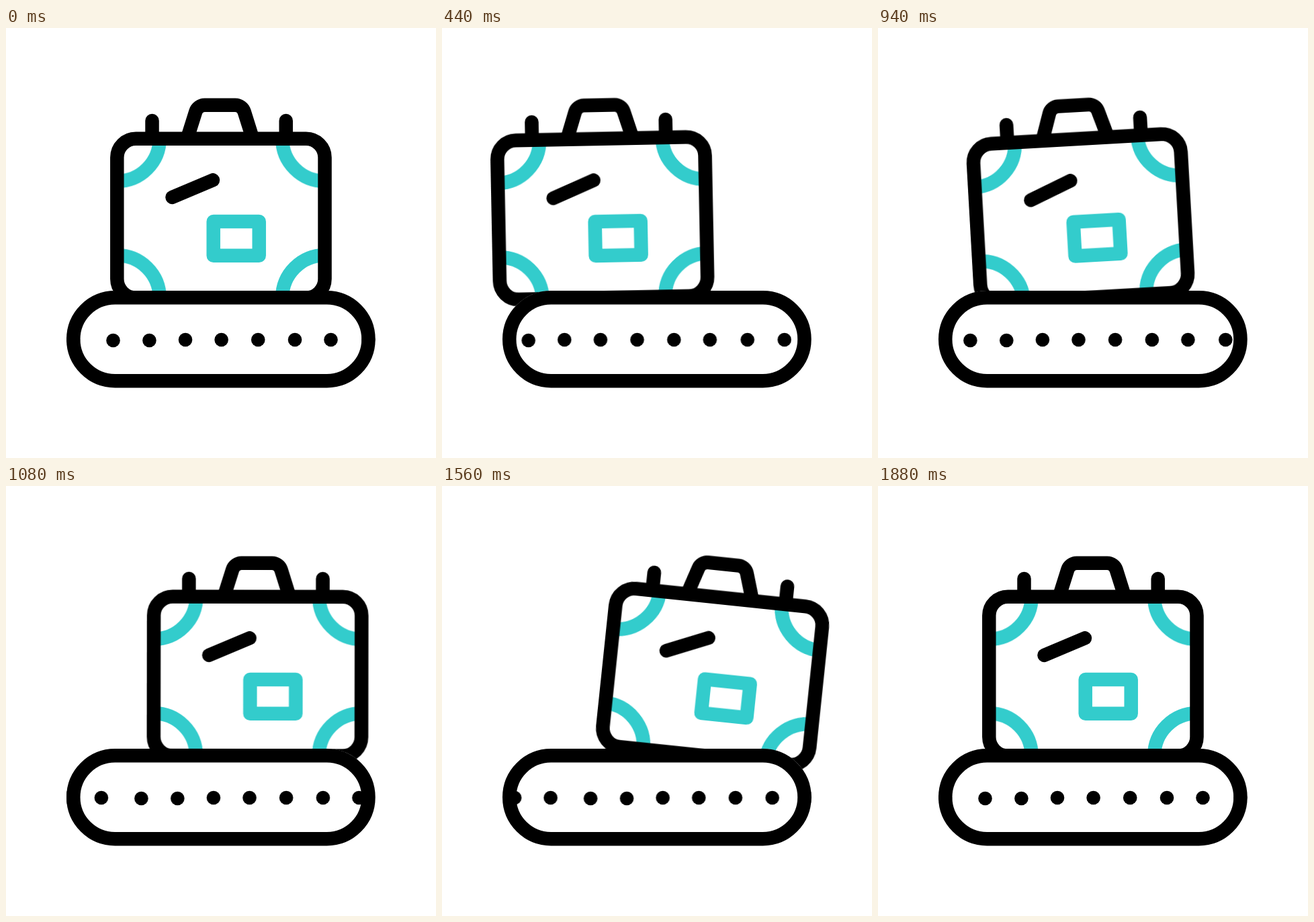
Write an HTML page that moves like this. It is 640x640 px and loops after 2400 ms.

```html
<!DOCTYPE html>
<html lang="en">
<head>
<meta charset="utf-8">
<title>Suitcase on a conveyor</title>
<style>
  html, body { margin: 0; width: 100%; height: 100%; overflow: hidden; background: #fff; }
  svg { display: block; width: 100%; height: 100%; }

  .line { fill: none; stroke: #000; stroke-width: 20.5; }
  .teal { fill: none; stroke: #3cc; stroke-width: 20.5; }
  .round { stroke-linecap: round; stroke-linejoin: round; }

  .slide, .tilt, .dots {
    animation: 2400ms cubic-bezier(.3333, 0, .6667, 1) infinite;
  }
  .slide { animation-name: slide; }
  .tilt { animation-name: tilt; transform-origin: 320px 402px; }
  .dots { animation-name: roll; }

  @keyframes slide {
    0% { transform: translateX(0); }
    26.667% { transform: translateX(-102.4px); }
    55% { transform: translateX(116.6px); }
    78.333%, 100% { transform: translateX(0); }
  }
  @keyframes tilt {
    0%, 14.583% { transform: rotate(0deg); }
    31.667% { transform: rotate(-8.95deg); }
    44.375% { transform: rotate(0deg); }
    56.667% { transform: rotate(8.95deg); }
    78.333%, 100% { transform: rotate(0deg); }
  }
  @keyframes roll {
    0% { transform: translateX(0); }
    26.667% { transform: translateX(-110px); }
    55% { transform: translateX(102px); }
    78.333%, 100% { transform: translateX(0); }
  }
</style>
</head>
<body>
<svg viewBox="0 0 640 640">
  <defs>
    <rect id="hull" x="90" y="391" width="459.7" height="144.4" rx="72.2"/>
    <path id="corner" class="teal" d="M-91.3 -118.4A63.3 63.3 0 0 1 -154.6 -55.1"/>
    <clipPath id="inside"><use href="#hull"/></clipPath>
    <mask id="outside" maskUnits="userSpaceOnUse" x="0" y="0" width="640" height="640">
      <rect width="640" height="640" fill="#fff"/>
      <use href="#hull" fill="#000"/>
    </mask>
  </defs>

  <!-- suitcase, hidden where the belt covers it -->
  <g mask="url(#outside)">
    <g class="slide">
      <g class="tilt">
        <g transform="translate(319.9 283.2)">
          <use href="#corner"/>
          <use href="#corner" transform="scale(-1 1)"/>
          <use href="#corner" transform="scale(1 -1)"/>
          <use href="#corner" transform="scale(-1 -1)"/>
        </g>
        <rect class="teal round" x="308.7" y="287.9" width="68" height="50.9"/>
        <path class="line round" d="M247.5 251.9L308 226.4M217.5 138V162M416.7 138V162"/>
        <path class="line" d="M270.8 161L282.3 124.5A14 14 0 0 1 295.6 114.8H341.3A14 14 0 0 1 354.6 124.5L366.1 161"/>
        <rect class="line" x="165.3" y="164.8" width="309.2" height="236.8" rx="28"/>
      </g>
    </g>
  </g>

  <!-- belt -->
  <rect class="line" x="100.25" y="401.25" width="439.2" height="123.9" rx="61.95"/>
  <g clip-path="url(#inside)">
    <g class="dots" id="dots"></g>
  </g>
</svg>
<script>
  const dots = document.getElementById('dots');
  const xs = [46.5, 100, 159.5, 213.4, 267, 320.6, 375.2, 430, 483.5, 539.4, 594.4];
  dots.innerHTML = xs.map((x, i) =>
    `<circle cx="${x}" cy="${i === 2 || i === 3 ? 465 : 464}" r="10.3"/>`).join('');
</script>
</body>
</html>
```
